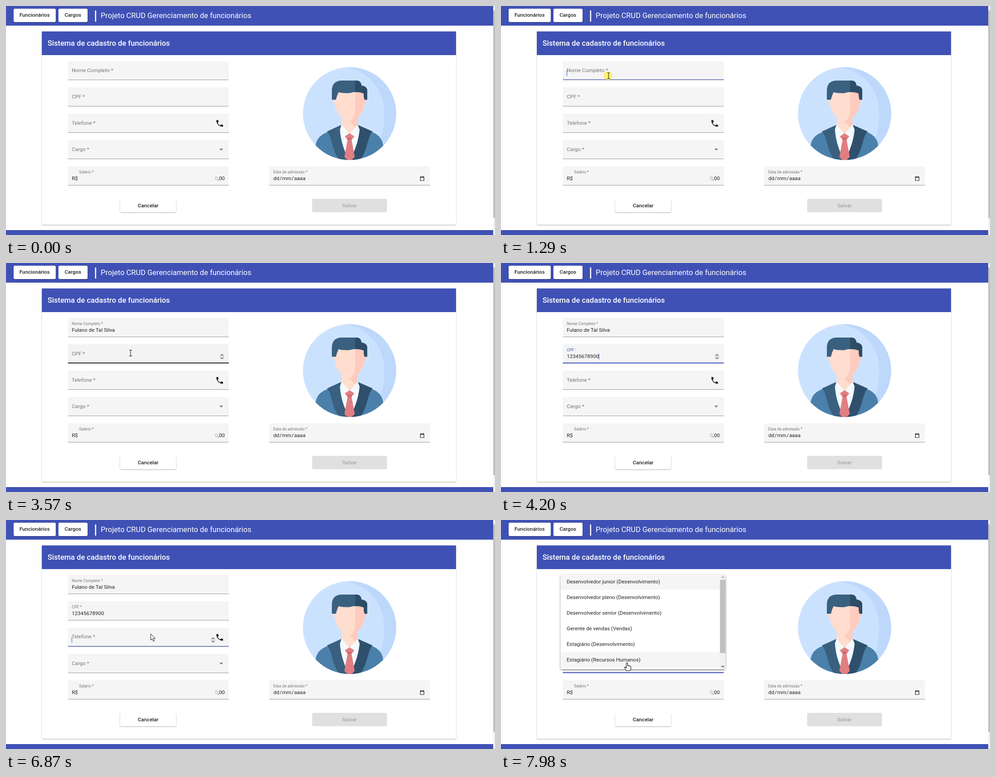
Animation of 1091 by 513 pixels, one loop 8 s. Source, as an HTML page:

```html
<!DOCTYPE html>
<html lang="pt-BR">
<head>
<meta charset="utf-8">
<title>Cadastro de funcionários</title>
<style>
  html, body { margin: 0; width: 100%; height: 100%; overflow: hidden; background: #fefefe; }
  svg { display: block; width: 100vw; height: 100vh; font: 11.67px Roboto, sans-serif; }
  .title { font-size: 16.67px; fill: #fff; }
  .strong { font-weight: 500; }
  .mid { text-anchor: middle; }
  .raised { filter: drop-shadow(0 1.5px 1px #0005); }
  .ink { fill: #222; }
  .small { font-size: 8.75px; }
  .label { fill: #757575; }
</style>
</head>
<body>
<svg viewBox="0 0 1091 513" preserveAspectRatio="none">
  <defs>
    <clipPath id="disc"><circle cx="766.5" cy="241" r="104"/></clipPath>
    <path id="arrow" d="M0 0V14.2L3.2 11.2 5.6 16.6 8 15.5 5.7 10.3H10Z" fill="#fff" stroke="#111" stroke-width="1"/>
    <path id="beam" d="M-3-6.5H-1Q0-6.5 0-5.5Q0-6.5 1-6.5H3M0-6V6M-3 6.5H-1Q0 6.5 0 5.5Q0 6.5 1 6.5H3" fill="none" stroke="#222" stroke-width="1.1"/>
    <path id="hand" d="M-1.5 1Q0-1.2 1.5 1V6.5Q3.2 5 4.2 7Q6 5.8 6.8 7.6Q8.8 7 8.8 9.5V13Q8.5 15.5 7 17.5H-1.5Q-2.2 15-5.5 11Q-6 8.6-3.5 9.5L-1.5 11.5Z" fill="#fff" stroke="#111" stroke-width="1.1"/>
  </defs>

  <rect width="1087" height="44" fill="#3f51b5"/>
  <rect y="502" width="1087" height="11" fill="#3f51b5"/>
  <rect x="1087" width="4" height="513" fill="#f1f1f1"/>
  <rect x="1087" y="10" width="4" height="465" fill="#c1c1c1"/>
  <g class="strong ink mid">
    <rect class="raised" x="17" y="6" width="94" height="30" rx="3" fill="#fff"/>
    <text x="63.7" y="24">Funcionários</text>
    <rect class="raised" x="117" y="6" width="65" height="30" rx="3" fill="#fff"/>
    <text x="149.3" y="24">Cargos</text>
  </g>
  <rect x="198.6" y="10" width="2.6" height="25" fill="#fff"/>
  <text class="title" x="211.3" y="26.5">Projeto CRUD Gerenciamento de funcionários</text>

  <rect class="raised" x="80" y="57" width="924" height="433" rx="3" fill="#fff"/>
  <rect x="80" y="57" width="924" height="53" fill="#3f51b5"/>
  <text class="title strong" x="92.7" y="89">Sistema de cadastro de funcionários</text>

  <g clip-path="url(#disc)">
    <rect x="662" y="137" width="209" height="209" fill="#cbe2ff"/>
    <path d="M757 137C812 146 844 190 844 241C844 285 832 315 808 337L875 350V130Z" fill="#bdd8fb"/>
    <path d="M690 350V322C690 300 699 290 716 283L748 270H785L818 283C834 290 842 300 842 322V350Z" fill="#4a80aa"/>
    <path d="M749 266L716 281C728 292 726 324 745 346H767Z" fill="#3a6080"/>
    <path d="M784 266L818 281C806 292 808 324 789 346H766Z" fill="#2f506c"/>
    <path d="M749 264H784L789 277C786 305 777 328 766 346C756 328 747 305 745 277Z" fill="#f4f9fd"/>
    <path d="M749 246H784V266L766.5 287L749 266Z" fill="#ffddcf"/>
    <path d="M784 246V266L779 272L766 259Z" fill="#ffcbbe"/>
    <path d="M734 190H800V220C800 238 780 258 767 258C754 258 734 238 734 220L728 209V196Z" fill="#ffddcf"/>
    <path d="M779 190H806V208L799 222C797 242 780 257 767 258C775 253 779 244 779 232Z" fill="#ffcbbe"/>
    <path d="M727 210V190Q727 167 750 167H781Q792 167 793 178Q806 180 806 190V210H800Q798 205 798 196Q781 190 767 195Q751 196 742 193Q738 201 736 210Z" fill="#3a6080"/>
    <path d="M779 167H781Q792 167 793 178Q806 180 806 190V210H800Q798 205 798 196Q790 192 779 193Z" fill="#2d4d67"/>
    <path d="M766.5 285L777 292L771 300L778 338L766.5 350L755 338L762 300L756 292Z" fill="#e27e82"/>
    <path d="M762 300H771L770 295H763Z" fill="#d0686e"/>
  </g>

  <g class="strong mid">
    <rect class="raised" x="254.5" y="432" width="125" height="30" rx="3" fill="#fff"/>
    <text class="ink" x="317" y="451">Cancelar</text>
    <rect x="683" y="432" width="167" height="30" rx="3" fill="#e0e0e0"/>
    <text x="766.5" y="451" fill="#a6a6a6">Salvar</text>
  </g>
  <g id="form"></g>
  <g id="extras">
    <path class="ink" transform="translate(466.7 253) scale(.833)" d="M6.62 10.79c1.44 2.83 3.76 5.14 6.59 6.59l2.2-2.2c.27-.27.67-.36 1.02-.24 1.12.37 2.33.57 3.57.57.55 0 1 .45 1 1V20c0 .55-.45 1-1 1-9.39 0-17-7.61-17-17 0-.55.45-1 1-1h3.5c.55 0 1 .45 1 1 0 1.25.2 2.45.57 3.57.11.35.03.74-.25 1.02l-2.2 2.2z"/>
    <path d="M476 319.5H484.4L480.2 323.8Z" fill="#777"/>
    <text class="ink" x="146.7" y="390">R$</text>
    <text class="ink" x="488" y="390" text-anchor="end"><tspan fill="#aaa">0</tspan>,00</text>
    <text class="ink" x="596.5" y="390">dd<tspan dx=".8">/</tspan><tspan dx=".8">mm</tspan><tspan dx=".8">/</tspan><tspan dx=".8">aaaa</tspan></text>
    <path d="M924.5 383H932.5V391H924.5ZM924 384H933M926 381V383M931 381V383" fill="none" stroke="#222" stroke-width="1.2"/>
  </g>
  <g id="overlay"></g>
</svg>
<script>
const LOOP = 8000, STEP = 70, NEVER = Infinity, BLUE = '#3f51b5';
const form = document.getElementById('form'), overlay = document.getElementById('overlay');

const fields = [
  { x: 138, y: 123, label: 'Nome Completo', value: 'Fulano de Tal Silva', caretX: 243.5, focus: 1250, paste: 1480, blur: 2690 },
  { x: 138, y: 182, label: 'CPF', value: '12345678900', caretX: 218.5, focus: 3700, paste: 4065, blur: 6060, spinX: 482 },
  { x: 138, y: 241, label: 'Telefone', value: '00912345678', caretX: 218.5, focus: 6825, paste: 7200, blur: 7420, spinX: 462 },
  { x: 138, y: 300, label: 'Cargo', value: '', select: true, focus: 7890, paste: NEVER, blur: NEVER },
  { x: 138, y: 359, label: 'Salário', labelX: 163, fixed: true, focus: NEVER },
  { x: 587, y: 359, label: 'Data de admissão', labelX: 596, fixed: true, date: true, focus: NEVER }
];

// Each visit of the pointer: [time, x, y] stops, then the time it vanishes.
const visits = [
  { end: 1830, stops: [[320, 972, 477], [1080, 245, 163], [1150, 240, 156], [1550, 240, 156], [1760, 631, 181]] },
  { end: 4200, stops: [[3220, 878, 125], [3640, 230, 208], [3990, 230, 208], [4130, 499, 231]] },
  { end: LOOP, stops: [[6260, 945, 289], [6730, 323, 255], [7150, 323, 255], [7400, 300, 373], [7630, 281, 320]] }
];
const clicks = [[1220, 1340], [3640, 3780], [6730, 6800], [7360, 7430]];
const jobs = ['Desenvolvedor junior (Desenvolvimento)', 'Desenvolvedor pleno (Desenvolvimento)',
  'Desenvolvedor senior (Desenvolvimento)', 'Gerente de vendas (Vendas)',
  'Estagiário (Desenvolvimento)', 'Estagiário (Recursos Humanos)'];

const clamp = v => Math.max(0, Math.min(1, v));
const lerp = (a, b, f) => a + (b - a) * f;
const easeOut = f => 1 - (1 - f) ** 3;
const smooth = f => f * f * (3 - 2 * f);

function pointerAt(t) {
  const visit = visits.find(v => t >= v.stops[0][0] && t < v.end);
  if (!visit) return null;
  const i = visit.stops.findLastIndex(s => s[0] <= t);
  const [t0, x0, y0] = visit.stops[i];
  const [t1, x1, y1] = visit.stops[i + 1] || [t0 + 1, x0, y0];
  const f = smooth(clamp(Math.floor((t - t0) / STEP) * STEP / (t1 - t0)));
  return { x: lerp(x0, x1, f), y: lerp(y0, y1, f) };
}

const covers = (f, p) => p && p.x >= f.x && p.x <= f.x + 359 && p.y >= f.y && p.y <= f.y + 43;

function spinner(x, y) {
  return `<rect x="${x - 5}" y="${y + 21}" width="10" height="13" fill="#e6e6e6"/>
    <path d="M${x - 3} ${y + 26}l3-3 3 3m-6 3.5l3 3 3-3" fill="none" stroke="#555" stroke-width="1.2"/>`;
}

function drawField(f, t, pointer) {
  const focused = t >= f.focus && t < f.blur;
  const hovered = covers(f, pointer);
  const filled = t >= f.paste;
  const lift = f.fixed ? 1 : easeOut(clamp((t - f.focus - 40) / 250));
  const lineY = f.y + 42.5;
  const line = (color, width, opacity) =>
    `<path d="M${f.x} ${lineY - (width - 1) / 2}h359" stroke="${color}" stroke-width="${width}" opacity="${opacity}"/>`;
  const tint = focused && lift > .5;

  let out = `<path d="M${f.x} ${f.y + 43}v-39.700q0-3.300 3.300-3.300h352.400q3.300 0 3.300 3.300v39.700z" fill="${hovered && !focused ? '#f3f3f3' : '#f5f5f5'}"/>`;
  out += line('#949494', 1, 1);
  if (focused) out += line(BLUE, 2, clamp((t - f.focus) / 80));
  else if (hovered) out += line('#222', 2, 1);
  out += `<text class="label" transform="translate(${f.labelX || 146.7} ${f.y + lerp(25, 15.5, lift)}) scale(${lerp(1, .75, lift)})"
    ${tint ? `style="fill:${BLUE}"` : ''}>${f.label} <tspan ${tint ? 'fill="#f5a565"' : ''}>*</tspan></text>`;
  if (filled) out += `<text class="ink" x="146.7" y="${f.y + 31}">${f.value}</text>`;
  if (focused && !f.select) {
    const since = t - (filled ? f.paste + 10 : f.focus);
    if (Math.floor(since / 530) % 2 <= 0)
      out += `<rect x="${filled ? f.caretX - .5 : 146.5}" y="${f.y + 21}" width="1" height="13" fill="${BLUE}"/>`;
  }
  if (f.spinX && (focused || hovered)) out += spinner(f.spinX, f.y);
  return out;
}

function drawPanel(t) {
  const f = clamp((t - 7870) / 100);
  if (!f) return '';
  const rows = jobs.map((job, i) => `<text class="ink" x="146.500" y="${142.3 + 35 * i}">${job}</text>`).join('');
  return `<g opacity="${f}" transform="translate(0 122) scale(1 ${lerp(.8, 1, f)}) translate(0 -122)">
    <rect x="133" y="122" width="368" height="212" rx="3" fill="#fff" style="filter:drop-shadow(0 2px 2px #0006)"/>
    <path d="M133 156V125q0-3 3-3H488.500V156ZM133 296H488.500V331H133Z" fill="#f5f5f5"/>
    <rect x="488.500" y="122" width="12.500" height="212" fill="#f1f1f1"/>
    <rect x="488.500" y="134" width="12.500" height="164" fill="#c1c1c1"/>
    <path d="M492 130l3-3 3 3" fill="none" stroke="#999" stroke-width="1.300"/>
    <path d="M492 326.500l3 3 3-3" fill="none" stroke="#444" stroke-width="1.500"/>${rows}</g>`;
}

function drawPointer(p, t) {
  if (!p) return '';
  const field = fields.find(f => covers(f, p));
  const inText = field && !field.date && p.y > field.y + 18 && p.y < field.y + 38;
  const onButton = p.y > 432 && p.y < 462 && p.x > 254 && p.x < 380;
  const shape = field?.select || onButton ? 'hand' : inText ? 'beam' : 'arrow';
  const pressed = clicks.some(([a, b]) => t >= a && t < b);
  return (pressed ? `<circle cx="${p.x - 1.5}" cy="${p.y}" r="9.700" fill="#ffee58" opacity=".85"/>` : '') +
    `<use href="#${shape}" x="${p.x}" y="${p.y}"/>`;
}

function render(t) {
  const pointer = pointerAt(t);
  form.innerHTML = fields.map(f => drawField(f, t, pointer)).join('');
  overlay.innerHTML = drawPanel(t) + drawPointer(pointer, t);
}

const start = performance.now();
function tick() {
  render((performance.now() - start) % LOOP);
  requestAnimationFrame(tick);
}
tick();
</script>
</body>
</html>
```
